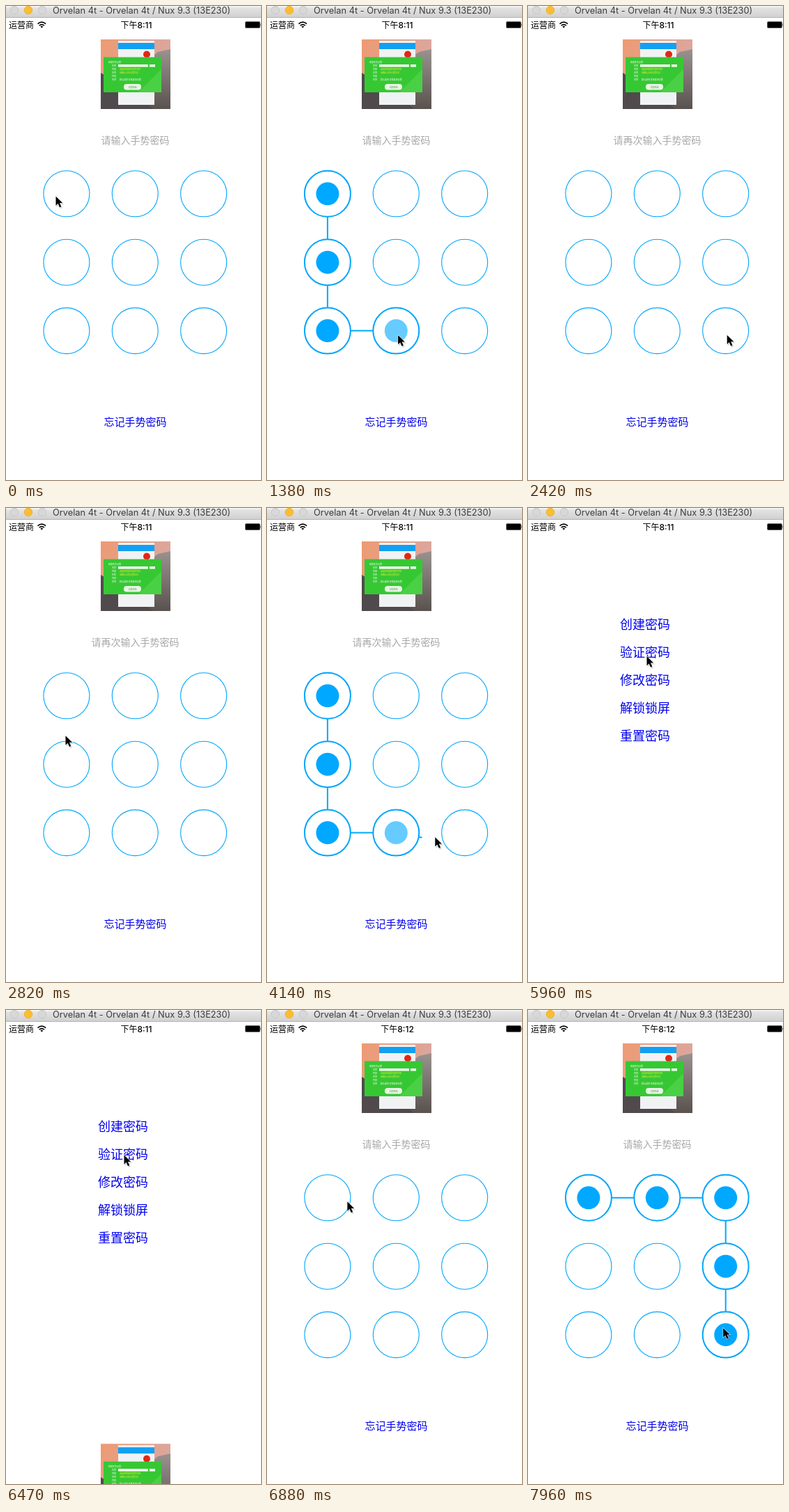
Recreate the animation shown at these times as an HTML page. Size 366 by 681 pixels, loop 8 s.

```html
<!DOCTYPE html>
<html lang="zh-CN">
<head>
<meta charset="utf-8">
<style>
html, body { margin: 0; width: 100%; height: 100%; overflow: hidden; background: #fff; }
svg { display: block; width: 366px; height: 681px; }
text { font-family: Inter, "Noto Sans CJK SC", "Noto Sans CJK", sans-serif; }
.mid { text-anchor: middle; }
.link { fill: #0000f0; }
.ring { fill: #fff; stroke: #00a5fb; }
.dot { fill: #00a8ff; }
.tiny { font-size: 3px; fill: #fff; }
</style>
</head>
<body>
<svg viewBox="0 0 366 681">
  <defs>
    <linearGradient id="bar" x2="0" y2="1">
      <stop offset="0" stop-color="#fafafa"/><stop offset=".18" stop-color="#e2e2e2"/><stop offset="1" stop-color="#d0d0d0"/>
    </linearGradient>
    <linearGradient id="sky" y2=".4">
      <stop offset="0" stop-color="#ee9a72"/><stop offset="1" stop-color="#d9a8a2"/>
    </linearGradient>
    <linearGradient id="rock" x2="0" y2="1">
      <stop offset="0" stop-color="#99928f"/><stop offset="1" stop-color="#5a524e"/>
    </linearGradient>
  </defs>

  <g id="menu" font-size="18" class="mid link"></g>

  <g id="page">
    <path d="M0 17h366v664H0z" fill="#fff"/>
    <path d="M136 48h100v100h-100z" fill="url(#sky)"/>
    <path d="M236 62v86h-36V80l18-14z" fill="url(#rock)"/>
    <path d="M136 96l26 16 50 36h-76z" fill="#504a4d"/>
    <path d="M161 50h52v92h-52z" fill="#f1f2f4"/>
    <path d="M161 53h52v9h-52z" fill="#12a0f2"/>
    <circle cx="202" cy="69.500" r="5" fill="#e02818"/>
    <path d="M140 73.500h83V124h-83z" fill="#36c833"/>
    <path d="M190 124l33-33v33z" fill="#4ad045"/>
    <path d="M161 84h43v3.500h-43zM206 84h8v3.500h-8z" fill="#fff"/>
    <text class="tiny" x="147" y="82">新建任务设置</text>
    <g id="rows"></g>
    <rect x="169" y="112" width="25" height="8.500" rx="4" fill="#e8f6e5"/>
    <text class="tiny mid" x="181.500" y="117.500" style="fill:#398c37">立即开始</text>

    <text id="hint" class="mid" x="185.500" y="197.500" font-size="14" font-weight="300" fill="#a8a8a8"></text>
    <path id="trail" fill="none" stroke="#00a8ff" stroke-width="2" stroke-linejoin="round"/>
    <g id="cells"></g>
    <text class="mid link" x="185.500" y="602.500" font-size="15">忘记手势密码</text>
  </g>

  <path d="M0 0h366v16.500H0z" fill="url(#bar)"/>
  <path d="M0 16.500h366" stroke="#b4b4b4"/>
  <g fill="#d8d8d8" stroke="#c8c8c8">
    <circle cx="12" cy="6" r="5.700"/>
    <circle cx="32" cy="6" r="5.700" fill="#fdbd30" stroke="#eeb02c"/>
    <circle cx="52" cy="6" r="5.700"/>
  </g>
  <text x="67" y="11" font-size="12.800" fill="#3c3c3c">Orvelan 4t - Orvelan 4t / Nux 9.3 (13E230)</text>

  <text x="4" y="31.700" font-size="12">运营商</text>
  <g fill="none" stroke="#000" stroke-width="1.700">
    <path d="M45.500 25.700q5.800-5 11.600 0M47.700 28.100q3.600-3 7.200 0"/>
    <path d="M49.300 29.500q2-1.500 4 0l-2 2z" fill="#000" stroke="none"/>
  </g>
  <text id="clock" class="mid" x="187" y="31.500" font-size="12" font-weight="500"></text>
  <rect x="343.500" y="22.500" width="21" height="9" rx="1.500" stroke="#666"/>
  <path d="M365.200 25.500h.8v3h-.8z" fill="#777"/>

  <g id="cursor">
    <path d="M1 1.500v15l3.500-3 2.500 5.500 3-1.400-2.400-5.200h4.700z" opacity=".18"/>
    <path d="M0 0v14.200l3.300-3.100 2.500 5.700 2.500-1.100-2.500-5.500h4.500z" stroke="#fff" stroke-width="1.100" paint-order="stroke"/>
  </g>
</svg>
<script>
const LOOP = 8000, LAG = 50, GLOW = 140;
const REACH = .17; // share of a step at which the next cell is touched
const $ = id => document.getElementById(id);
const center = i => [86.9 + 98.4 * (i % 3), 269.8 + 98.4 * Math.floor(i / 3)];

// Each leg moves the pointer through its stops at an even pace, then rests.
const move = (from, to, ...stops) => ({ from, to, stops });

// A gesture is a leg across cells; it is released when the next leg starts.
const gesture = (from, to, dx, dy, ...cells) => ({
  ...move(from, to, ...cells.slice(1).map(i => {
    const [x, y] = center(i);
    return [x + dx, y + dy];
  })),
  cells
});

const legs = [
  move(60, 240, [67, 263]),
  gesture(420, 1700, 3, 7, 0, 3, 6, 7, 8),
  move(2420, 3220, [86, 328], [77, 264]),
  gesture(3240, 4257, 3, 7, 0, 3, 6, 7, 8),
  move(4860, 5620, [178, 247]),
  move(5680, 6000, [170, 209]),
  move(6700, 7060, [116, 276], [88, 268]),
  gesture(7060, 7780, -3, -9, 0, 1, 2, 5, 8)
];
legs.reduce((start, leg) => {
  leg.stops.unshift(start);
  return leg.stops.at(-1);
}, [72, 274]);

const clamp = p => Math.min(1, Math.max(0, p));
const legAt = t => legs.findLast(leg => t >= leg.from) || legs[0];

function pointAt(t, leg = legAt(t)) {
  const last = leg.stops.length - 1;
  const k = last * clamp((t - leg.from) / (leg.to - leg.from));
  const i = Math.min(last - 1, Math.floor(k));
  return leg.stops[i].map((a, n) => a + (leg.stops[i + 1][n] - a) * (k - i));
}

// Time since the gesture touched its nth cell
function touchAge(t, { from, to, cells }, n) {
  const step = (to - from) / (cells.length - 1);
  return t - from - (n && (n - REACH) * step + LAG);
}

function ease(t, from, to) {
  const p = clamp((t - from) / (to - from));
  return p < .5 ? 4 * p ** 3 : 1 - 4 * (1 - p) ** 3;
}

$("menu").innerHTML = ["创建密码", "验证密码", "修改密码", "解锁锁屏", "重置密码"]
  .map((s, i) => `<text x="168" y="${173.5 + 40 * i}">${s}</text>`).join("");

$("rows").innerHTML = ["", "请选择需要处理的内容", "请确认当前设置信息", "", "默认选项  其他选项设置"]
  .map((s, i) => `<text class="tiny" y="${87 + 5 * i}"><tspan x="152">${i % 2 ? "内容" : "名称"}</tspan>`
    + `<tspan x="163" fill="${i < 3 ? "#f4ee35" : "#fff"}">${s}</tspan></text>`).join("");

$("cells").innerHTML = Array.from({ length: 9 }, (_, i) => {
  const [x, y] = center(i);
  return `<g><circle class="ring" cx="${x}" cy="${y}" r="33"/><circle class="dot" cx="${x}" cy="${y}" r="16.500"/></g>`;
}).join("");
const cells = [...$("cells").children].map(g => g.children);

function draw(t) {
  const leg = legAt(t);
  const [x, y] = pointAt(t);
  $("cursor").setAttribute("transform", `translate(${x - .5} ${y - .6}) scale(.94)`);

  const path = leg.cells || [];
  const touched = path.filter((_, n) => touchAge(t, leg, n) >= 0);
  cells.forEach(([ring, dot], i) => {
    const n = touched.indexOf(i);
    ring.setAttribute("stroke-width", n < 0 ? 1.1 : 2);
    dot.setAttribute("opacity", n < 0 ? 0 : touchAge(t, leg, n) < GLOW ? .6 : 1);
  });
  const line = [...touched.map(center), pointAt(t - LAG, leg)];
  $("trail").setAttribute("d", touched.length ? "M" + line.join("L") : "");

  const down = ease(t, 4900, 5400) - ease(t, 6310, 6810);
  $("page").setAttribute("transform", `translate(0 ${664 * down})`);
  $("hint").textContent = t >= 2420 && t < 6000 ? "请再次输入手势密码" : "请输入手势密码";
  $("clock").textContent = t < 6500 ? "下午8:11" : "下午8:12";
}

function tick() {
  draw(performance.now() % LOOP);
  requestAnimationFrame(tick);
}
tick();
</script>
</body>
</html>
```
